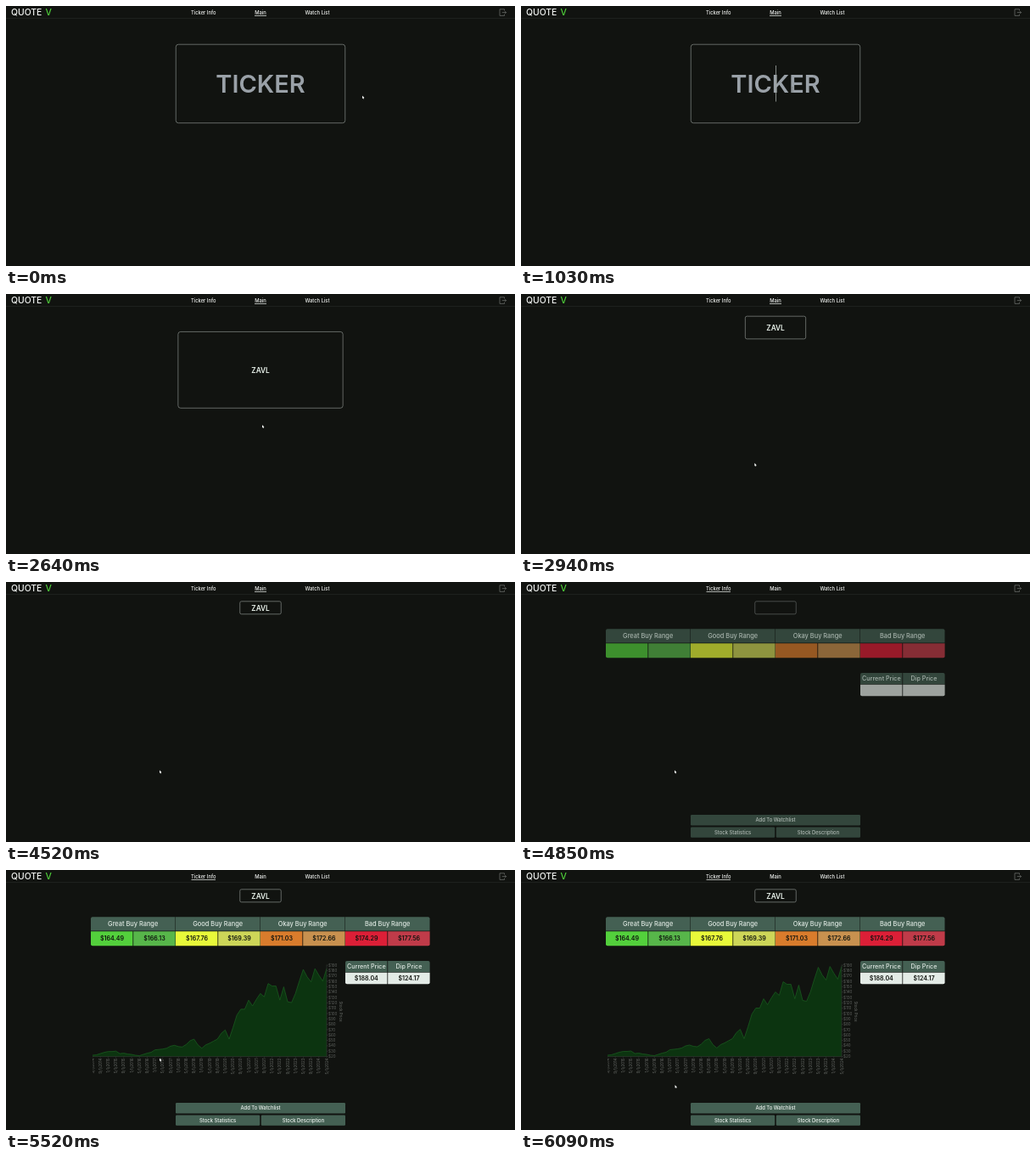
Animation of 600x306 px, one loop 6.12 s. Source, as an HTML page with a canvas:

```html
<!DOCTYPE html>
<html lang="en">
<head>
<meta charset="utf-8">
<title>Ticker dashboard</title>
<style>
html, body { margin: 0; width: 100%; height: 100%; overflow: hidden; background: #111310; }
canvas { display: block; width: 100vw; height: 100vh; }
</style>
</head>
<body>
<canvas id="stage"></canvas>
<script>
const W = 600, H = 306, LOOP = 6120;
const canvas = document.getElementById('stage');
const ctx = canvas.getContext('2d');

const SYMBOL = 'ZAVL';
const PANEL = '#446053', PALE = '#e3ebe6';
const KEYS = [1230, 1400, 1560, 1740];
const T = { focus: 1010, button: 1320, submit: 2610, page: 4760, data: 4880 };

// Time, x and y of the pointer tip
const POINTER = [
  [0, 420, 105.5], [640, 367, 104], [1000, 320, 98], [1970, 320, 98],
  [2450, 302, 154], [2640, 302, 154], [2930, 275.3, 199], [3850, 275.3, 199],
  [4060, 181, 221.5], [5930, 181, 221.5], [6080, 181.5, 253]
];

const RANGES = [
  ['Great Buy Range', '#53d03c', '$164.49', '#57b64a', '$166.13'],
  ['Good Buy Range', '#e8f93a', '$167.76', '#cdd658', '$169.39'],
  ['Okay Buy Range', '#d97c2c', '$171.03', '#c8914f', '$172.66'],
  ['Bad Buy Range', '#dc1f37', '$174.29', '#c03b49', '$177.56']
];

// Height of the price curve above its base, every two months
const PRICES = [
  1.5, 2, 3.5, 5, 6, 6, 6.5, 3.5, 4, 3, 2.5, 1.5, 1, 2.5, 4, 5,
  8, 8.5, 9, 10, 12.5, 13.5, 12, 11.5, 14.5, 19, 21, 14, 10, 14, 16, 18.5,
  21, 28, 32, 21, 35, 50, 57, 57, 68, 61, 69, 76, 72, 88, 85, 85,
  68, 84, 66, 65, 76, 91, 105, 96, 90, 106, 98, 91, 106
];

const clamp = v => Math.max(0, Math.min(1, v));
const mix = (a, b, k) => a + (b - a) * k;

// CSS "ease": cubic-bezier(.25, .1, .25, 1)
function ease(v) {
  const x = clamp(v);
  let lo = 0, hi = 1;
  for (let i = 0; i < 20; i++) {
    const s = (lo + hi) / 2, r = 1 - s;
    if (.75 * r * r * s + .75 * r * s * s + s * s * s < x) lo = s; else hi = s;
  }
  const r = 1 - lo;
  return .3 * r * r * lo + 3 * r * lo * lo + lo * lo * lo;
}

function text(str, x, y, size, color, weight = 500, align = 'center') {
  ctx.font = `${weight} ${size}px Inter, "Open Sans", sans-serif`;
  ctx.fillStyle = color;
  ctx.textAlign = align;
  ctx.textBaseline = 'alphabetic';
  ctx.fillText(str, x, y + size * .364);
}

function turned(str, x, y, angle, size, color, align) {
  ctx.save();
  ctx.translate(x, y);
  ctx.rotate(angle);
  text(str, 0, 0, size, color, 400, align);
  ctx.restore();
}

function box(x, y, w, h, color, radii = 0) {
  ctx.beginPath();
  ctx.roundRect(x, y, w, h, radii);
  ctx.fillStyle = color;
  ctx.fill();
}

function line(points, color, width) {
  ctx.beginPath();
  points.forEach(([x, y]) => ctx.lineTo(x, y));
  ctx.strokeStyle = color;
  ctx.lineWidth = width;
  ctx.stroke();
}

function button(label, x, y, w, h, size, weight) {
  box(x, y, w, h, PANEL, 1.2);
  text(label, x + w / 2, y + h / 2, size, '#eef4f0', weight);
}

function drawHeader(t) {
  text('QUOTE', 6, 7.4, 10.4, '#f2f4f2', 500, 'left');
  text('V', 50.3, 7.4, 10.4, '#4fd03a', 500);
  [['Ticker Info', 232.7], ['Main', 300], ['Watch List', 367]].forEach(([label, x]) =>
    text(label, x, 7.5, 5.8, '#f0f2f0'));
  if (t < T.page) box(293, 11.2, 14, .8, '#d5d9d5');
  else box(218.5, 11.2, 28.5, .8, '#d5d9d5');
  box(0, 14, W, .8, '#232623');
  line([[587.5, 5.5], [587.5, 3.8], [582, 3.8], [582, 11.4], [587.5, 11.4], [587.5, 9.7]], '#747874', .7);
  line([[584.8, 7.6], [589.6, 7.6]], '#747874', .7);
  line([[588.2, 6.2], [589.6, 7.6], [588.2, 9]], '#747874', .7);
}

function drawInput(t) {
  const k = ease((t - T.submit) / 600);
  const small = t >= T.submit;
  const w = mix(199.5, 48.5, k), h = mix(92.5, 15, k), y = mix(45.2, 22.8, k);
  const mid = y + h / 2;
  ctx.beginPath();
  ctx.roundRect(300 - w / 2, y, w, h, mix(3, 1.8, k));
  ctx.strokeStyle = '#7f8580';
  ctx.lineWidth = .75;
  ctx.stroke();

  const typed = SYMBOL.slice(0, KEYS.filter(key => t >= key).length);
  if (!typed) text('TICKER', 300, 91.8, 29, '#9aa1a8', 600);
  else if (t < T.page || t >= T.data) text(typed, 300, mid + .3, small ? 8.3 : 29, '#e9f2eb', 600);

  if (t >= T.focus && t < 2250) {
    ctx.font = '600 29px Inter, "Open Sans", sans-serif';
    const half = ctx.measureText(typed).width / 2;
    box(300 + half, 70, .8, 42.5, '#a3aaa5');
  }
}

function drawRanges(t) {
  RANGES.forEach(([label, left, low, right, high], i) => {
    const x = 100 + i * 100, first = i === 0, last = i === 3;
    box(x, 55.3, 99.5, 16.2, PANEL, [first ? 2 : 0, last ? 2 : 0, 0, 0]);
    text(label, x + 49.7, 63.4, 7.4, '#dfe8e2');
    box(x, 72.2, 49.4, 17, left, [0, 0, 0, first ? 2 : 0]);
    box(x + 50.2, 72.2, 49.4, 17, right, [0, 0, last ? 2 : 0, 0]);
    if (t >= T.data) {
      text(low, x + 25, 80.6, 7.1, '#10140f', 600);
      text(high, x + 75, 80.6, 7.1, '#10140f', 600);
    }
  });
  [['Current Price', '$188.04'], ['Dip Price', '$124.17']].forEach(([label, price], i) => {
    const x = 400 + i * 50.2;
    box(x, 107, 49.4, 13.2, PANEL, [i ? 0 : 2, i ? 2 : 0, 0, 0]);
    text(label, x + 24.8, 113.6, 7.2, '#dfe8e2');
    box(x, 120.8, 49.4, 13.5, PALE, [0, 0, i ? 2 : 0, i ? 0 : 2]);
    if (t >= T.data) text(price, x + 24.8, 127.6, 7.1, '#10140f', 600);
  });
}

function drawChart(t) {
  const left = 102, right = 378, base = 219.5;
  const grow = ease((t - T.data) / 800);
  const step = (right - left) / (PRICES.length - 1);
  const curve = PRICES.map((p, i) => [left + i * step, base - p * grow]);

  ctx.beginPath();
  ctx.moveTo(left, base);
  curve.forEach(([x, y]) => ctx.lineTo(x, y));
  ctx.lineTo(right, base);
  ctx.fillStyle = '#0c3410';
  ctx.fill();
  line(curve, '#1c6022', .7);
  line([[left, base], [right, base], [right, 111.5]], '#383c38', .5);

  for (let i = 0; i < 18; i++) {
    const y = base - i * 6.32;
    line([[right, y], [right + 1.8, y]], '#4a4e4a', .4);
    text('$' + (20 + i * 10), 380, y, 4.5, '#606460', 400, 'left');
  }
  turned('Stock Price', 394.8, 166.5, Math.PI / 2, 4.5, '#6a6e6a', 'center');

  ctx.save();
  ctx.beginPath();
  ctx.rect(left, base, 290, 30);
  ctx.clip();
  for (let i = 0; i <= 30; i++) {
    const month = 4 + i * 4, x = left + i * (right - left) / 30;
    const label = `${month % 12 + 1}/1/${2014 + Math.floor(month / 12)}`;
    line([[x, base], [x, base + 1.6]], '#4a4e4a', .4);
    turned(label, x, 221.5, -Math.PI / 2, 4.5, '#686c68', 'right');
  }
  ctx.restore();
}

function drawPointer(t) {
  let i = 0;
  while (i < POINTER.length - 2 && t >= POINTER[i + 1][0]) i++;
  const [t0, x0, y0] = POINTER[i], [t1, x1, y1] = POINTER[i + 1];
  const v = clamp((t - t0) / (t1 - t0)), k = v * v * (3 - 2 * v);
  const x = mix(x0, x1, k), y = mix(y0, y1, k);

  if (t < T.submit && x < 400 && y < 138) {
    box(x - .3, y - 2.5, .7, 5.5, '#7d837f');
    box(x - 1, y - 2.7, 2, .5, '#7d837f');
    box(x - 1, y + 2.8, 2, .5, '#7d837f');
    return;
  }
  ctx.beginPath();
  [[0, 0], [0, 3.6], [.8, 2.9], [1.4, 4.1], [2, 3.8], [1.5, 2.7], [2.5, 2.6]]
    .forEach(([dx, dy]) => ctx.lineTo(x + dx, y + dy));
  ctx.closePath();
  ctx.fillStyle = '#f4f6f4';
  ctx.fill();
}

function draw(t) {
  ctx.fillStyle = '#111310';
  ctx.fillRect(0, 0, W, H);
  drawHeader(t);

  ctx.globalAlpha = t < T.page ? 1 : ease((t - T.page + 10) / 260);
  drawInput(t);
  if (t >= T.page) {
    drawRanges(t);
    if (t >= T.data) drawChart(t);
    button('Add To Watchlist', 200, 274, 200, 12.5, 5.85);
    button('Stock Statistics', 200, 288.5, 99.2, 12.3, 5.85);
    button('Stock Description', 300.8, 288.5, 99.2, 12.3, 5.85);
  } else if (t >= T.button && t < T.submit) {
    ctx.globalAlpha = ease((t - T.button) / 300);
    button('Continue', 272, 147.5, 56, 12.7, 7.5, 600);
  }
  ctx.globalAlpha = 1;
  drawPointer(t);
}

function resize() {
  const dpr = window.devicePixelRatio || 1;
  canvas.width = Math.round(innerWidth * dpr);
  canvas.height = Math.round(innerHeight * dpr);
  ctx.setTransform(canvas.width / W, 0, 0, canvas.height / H, 0, 0);
}

const start = performance.now();
function tick() {
  draw((performance.now() - start) % LOOP);
  requestAnimationFrame(tick);
}
addEventListener('resize', resize);
resize();
tick();
</script>
</body>
</html>
```
